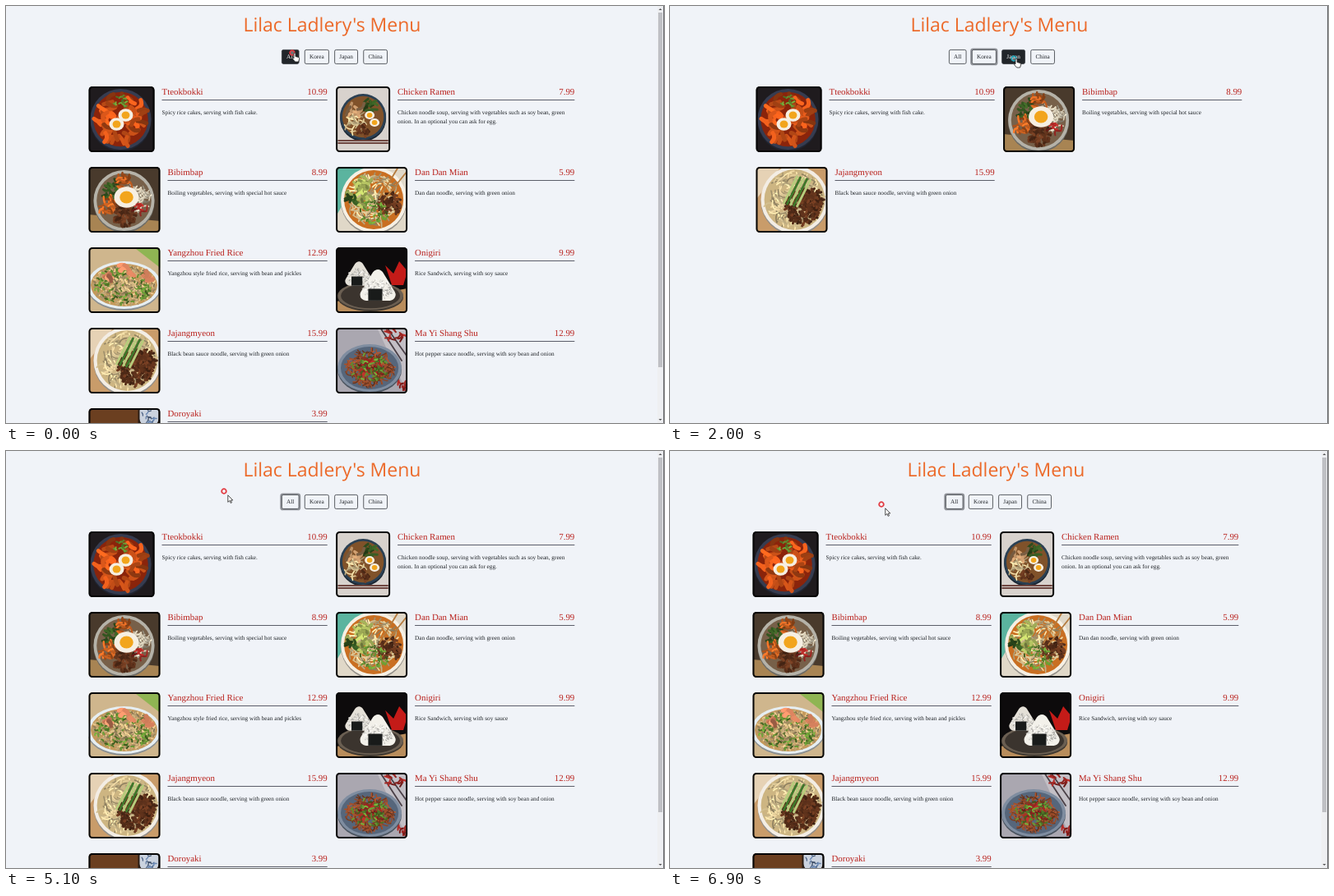
Write an HTML page that moves like this. It is 800x508 px and loops after 7000 ms.

```html
<!DOCTYPE html>
<html lang="en">
<head>
<meta charset="utf-8">
<title>Menu</title>
<style>
  html, body { margin: 0; width: 100%; height: 100%; overflow: hidden; background: #f0f3f8; }
  svg { display: block; }
  text { font: 7.26px "Liberation Serif", "Times New Roman", serif; fill: #212529; text-rendering: geometricPrecision; }
  .head { font-size: 10.88px; fill: #b9211c; }
  .title { font: 500 23px "Open Sans", sans-serif; fill: #ec6a2a; text-anchor: middle; }
  .end { text-anchor: end; }
  .mid { text-anchor: middle; }
</style>
</head>
<body>
<svg id="stage" width="800" height="508" viewBox="0 0 800 508"></svg>
<script>
let seed = 11;
const random = () => (seed = seed * 16807 % 2147483647) / 2147483647;
const spread = size => (random() * 2 - 1) * size;

// Drawing helpers that return SVG markup
const rect = (x, y, w, h, fill, extra = '') =>
  `<rect x="${x}" y="${y}" width="${w}" height="${h}" fill="${fill}" ${extra}/>`;
const oval = (x, y, rx, ry, fill) => `<ellipse cx="${x}" cy="${y}" rx="${rx}" ry="${ry}" fill="${fill}"/>`;
const shape = (d, fill) => `<path d="${d}" fill="${fill}"/>`;
const stroke = (d, color, width) =>
  `<path d="${d}" fill="none" stroke="${color}" stroke-width="${width}" stroke-linecap="round"/>`;
const text = (x, y, words, cls = '', extra = '') =>
  `<text x="${x}" y="${y}" class="${cls}" ${extra}>${words}</text>`;
const shade = (hex, level) => `rgb(${hex.match(/\w\w/g).map(h => Math.round(parseInt(h, 16) * level))})`;
const back = color => rect(0, 0, 87, 80, color);
const egg = (x, y, r = 9) => oval(x, y, r, r * .85, '#f6efe2') + oval(x, y, r * .55, r * .5, '#f2a51c');
const chopsticks = (d, color) => stroke(d, color, 1.8);

// Each ingredient: colour, piece length, piece width, how densely it covers its area
const food = {
  riceCake: ['#ee5f1c', 11, 5, 1.1],
  noodle: ['#f0d9a4', 11, 1.6, 1.1],
  redNoodle: ['#a5512c', 8, 1.5, 1.6],
  rice: ['#e2c48c', 3, 1.7, .9],
  whiteRice: ['#faf8f2', 2, 1, .5],
  sprout: ['#e6dcc4', 7, 1.6, 1],
  leaf: ['#3d6426', 6, 3, 1.2],
  lettuce: ['#bccb66', 7, 3.5, 1.1],
  scallion: ['#6c9f36', 3, 2, .3],
  carrot: ['#ea7026', 7, 2.4, 1.2],
  shrimp: ['#f3936a', 7, 5, .8],
  chicken: ['#d6a474', 11, 3.5, .9],
  mince: ['#6d3a20', 3, 3, 1.2],
  chili: ['#b82c28', 7, 2, .6],
  blue: ['#6e8dbb', 4, 1.3, .3]
};

const plate = (x, y, rx, ry, rim, inside) => ({
  x, y, rx: rx * .84, ry: ry * .84,
  svg: oval(x, y + 2, rx, ry, shade(rim, .6)) + oval(x, y, rx, ry, rim) + oval(x, y, rx * .9, ry * .9, inside)
});

// Scattered pieces on part of a plate; the part is named by its clock hour, or is the middle
function heap({ x, y, rx, ry }, kind, size, hour) {
  const [color, length, width, cover] = food[kind];
  const angle = hour * Math.PI / 6, out = hour === undefined ? 0 : 1 - size;
  const cx = x + (out && rx * out * Math.sin(angle)), cy = y - (out && ry * out * Math.cos(angle));
  const count = cover * Math.PI * rx * ry * size * size / (length * width);
  let svg = '';
  for (let i = 0; i < count; i++) {
    const a = random() * 7, far = Math.sqrt(random()) * size, turn = random() * 7, bow = spread(.5);
    const dx = length * Math.cos(turn), dy = length * Math.sin(turn);
    const px = cx + rx * far * Math.cos(a) - dx / 2, py = cy + ry * far * Math.sin(a) - dy / 2;
    const curve = [dx / 2 - dy * bow, dy / 2 + dx * bow, dx, dy].map(v => v.toFixed(1));
    svg += stroke(`M${px.toFixed(1)} ${py.toFixed(1)}q${curve}`, shade(color, .55 + random() * .6), width);
  }
  return svg;
}
const serve = (dish, ...heaps) => dish.svg + heaps.map(h => heap(dish, ...h)).join('');

// Rounded rice triangle with a strip of seaweed
const riceBall = (x, y, s, color) =>
  `<path d="M${x} ${y - s * .65}l${s * .8} ${s * 1.3}h${-s * 1.6}z" fill="${color}" stroke="${color}"
    stroke-width="${s * .8}" stroke-linejoin="round"/>` +
  heap({ x, y: y + s * .3, rx: s, ry: s * .7 }, 'whiteRice', 1) +
  rect(x - s * .65, y + s * .25, s * .95, s * .8, '#191b1a');

const art = {
  tteokbokki: () => back('#1f1b1e') + serve(plate(39, 40, 37, 37, '#363c50', '#8a240b'),
    ['riceCake', .95], ['scallion', .3, 0]) + egg(45, 35) + egg(34, 46),

  ramen: () => back('#d8d2cd') + serve(plate(33, 37, 28, 28, '#2b4053', '#80522a'),
    ['noodle', .5, 8], ['leaf', .35, 1], ['mince', .3, 6], ['chicken', .4, 10.5]) + egg(41, 35, 6) + egg(47, 44, 6) +
    chopsticks('M3 66H63M3 69H63', '#6f4741'),

  bibimbap: () => back('#493a2c') + shape('M0 58L87 66V80H0z', '#a88453') +
    serve(plate(43, 41, 37, 37, '#b5b2a8', '#776049'), ['sprout', .55, 2.5], ['leaf', .4, 10.5], ['carrot', .36, 8.5],
      ['carrot', .3, 0], ['mince', .45, 6], ['chili', .25, 4]) + egg(46, 37, 15),

  dandan: () => back('#e0d8c8') + shape('M0 0H36L0 60z', '#5bb49f') +
    serve(plate(46, 40, 40, 40, '#f6f0e4', '#c96f22'), ['noodle', .9], ['lettuce', .45, 9.5], ['leaf', .2, 9],
      ['lettuce', .25, 11], ['mince', .4, 3.5], ['scallion', .5, 6]) + chopsticks('M53 38L76 0M59 40L86 6', '#b57b3d'),

  friedRice: () => back('#cfb68d') + shape('M55 0H87V25z', '#8fb553') +
    serve(plate(43, 46, 45, 29, '#e6eef2', '#c4995c'), ['rice', 1], ['scallion', .95], ['shrimp', .3, 0],
      ['shrimp', .25, 10.5], ['shrimp', .25, 2], ['rice', .4]),

  onigiri: () => back('#0d0b0c') + shape('M0 66L87 50V80H0z', '#b98d5c') +
    shape('M60 22L70 32 77 17 87 29 82 46H68z', '#c41b18') +
    plate(42, 59, 40, 17, '#6b5f52', '#3b342e').svg + riceBall(28, 32, 14, '#e4e0d7') + riceBall(51, 46, 18, '#f3f1ea'),

  jajangmyeon: () => back('#c99c6a') + shape('M0 0H30L0 40z', '#e6d2b5') +
    serve(plate(47, 40, 41, 41, '#f3ede4', '#cdb582'), ['noodle', .95], ['mince', .62, 4.5], ['mince', .45, 3]) +
    [0, 1, 2, 3, 4].map(i => stroke(`M${50 + i * 4} ${12 + i}l-16 32`, i % 2 ? '#3f762a' : '#b7cc7c', 2.8)).join(''),

  mayi: () => back('#aaa7b0') + shape('M50 0H87V80z', '#c3bfc5') + chopsticks('M54 0L80 40M62 0L86 34', '#4a4047') +
    heap({ x: 72, y: 9, rx: 11, ry: 8 }, 'chili', 1) + heap({ x: 79, y: 70, rx: 8, ry: 8 }, 'chili', 1) +
    serve(plate(41, 49, 39, 29, '#7f8da0', '#56667b'), ['redNoodle', .85], ['chili', .5], ['scallion', .7]),

  dorayaki: () => back('#2a1c14') + shape('M0 0H60V26L0 34z', '#6b3f20') + rect(62, -6, 23, 28, '#cbd3df', 'rx="9"') +
    heap({ x: 73, y: 10, rx: 9, ry: 9 }, 'blue', 1) + serve(plate(43, 54, 41, 22, '#d7e0ea', '#eceff2'), ['blue', 1]) +
    oval(32, 52, 22, 10, '#e0b173') + oval(32, 47, 23, 11, '#a5602a') + oval(31, 45, 18, 7, '#bd7a3a') +
    shape('M34 32Q51 27 68 60Q40 66 34 32z', '#e6bb7d') + shape('M34 32Q70 22 68 60Q54 39 34 32z', '#b46d2c') +
    stroke('M37 36Q53 43 64 60', '#321711', 3)
};

const dishes = [
  ['tteokbokki', 80, 'Korea', 'Tteokbokki', '10.99', 'Spicy rice cakes, serving with fish cake.'],
  ['ramen', 66, 'Japan', 'Chicken Ramen', '7.99', 'Chicken noodle soup, serving with vegetables such as soy bean, green',
    'onion. In an optional you can ask for egg.'],
  ['bibimbap', 87, 'Korea', 'Bibimbap', '8.99', 'Boiling vegetables, serving with special hot sauce'],
  ['dandan', 87, 'China', 'Dan Dan Mian', '5.99', 'Dan dan noodle, serving with green onion'],
  ['friedRice', 87, 'China', 'Yangzhou Fried Rice', '12.99', 'Yangzhou style fried rice, serving with bean and pickles'],
  ['onigiri', 87, 'Japan', 'Onigiri', '9.99', 'Rice Sandwich, serving with soy sauce'],
  ['jajangmyeon', 87, 'Korea', 'Jajangmyeon', '15.99', 'Black bean sauce noodle, serving with green onion'],
  ['mayi', 87, 'China', 'Ma Yi Shang Shu', '12.99', 'Hot pepper sauce noodle, serving with soy bean and onion'],
  ['dorayaki', 87, 'Japan', 'Doroyaki', '3.99', 'Red bean paste dessert, serving with honey.']
];

function card([id, w, , name, price, ...lines], index) {
  const left = w + 9, right = 290.2;
  return `<g transform="translate(${100.5 + index % 2 * 300.6} ${98 + (index >> 1) * 98})">
    <use href="#${id}"/>${rect(1, 1, w - 2, 78, 'none', 'rx="3.5" stroke="#050505" stroke-width="2"')}
    ${text(left, 10.3, name, 'head')}${text(right, 10.3, price, 'head end')}
    ${rect(left, 16, right - left, 1, '#5b5d69')}
    ${lines.map((line, i) => text(left, 33.7 + i * 11, line)).join('')}</g>`;
}

// Buttons in a row, each as wide as its label plus padding
const pen = document.createElement('canvas').getContext('2d');
pen.font = '72.6px "Liberation Serif", "Times New Roman", serif';
let edge = 335;
const buttons = ['All', 'Korea', 'Japan', 'China'].map(name => {
  const w = pen.measureText(name).width / 10 + 12.2, x = edge;
  edge += w + 6.4;
  return { name, x, w };
});

document.getElementById('stage').innerHTML = `<defs><filter id="soft"><feGaussianBlur stdDeviation=".4"/></filter>
  ${dishes.map(([id, w]) => `<clipPath id="${id}Frame">${rect(0, 0, w, 80, '#000', 'rx="4.5"')}</clipPath>
    <g id="${id}" clip-path="url(#${id}Frame)"><g filter="url(#soft)">${art[id]()}</g></g>`).join('')}</defs>
  <g id="page">${text(396.5, 31.3, "Lilac Ladlery's Menu", 'title')}<g id="buttons"></g>
  ${buttons.map(({ name }) => `<g id="view${name}">${
    dishes.filter(dish => name === 'All' || dish[2] === name).map(card).join('')}</g>`).join('')}</g>
  <g id="scrollbar">${rect(792, 0, 7, 508, '#eeeff2')}
    ${shape('M793.5 5l2-2 2 2zM793.5 503l2 2 2-2z', '#555')}
    <rect id="thumb" x="793" width="5" height="432" fill="#bfc0c4"/></g>
  ${rect(799, 0, 1, 508, '#707175')}<g id="pointer"></g>`;
const part = id => document.getElementById(id);

// Value after a series of eased moves [start time, ...new values], each 300 ms long
const glide = (from, moves, t) => moves.reduce((now, [start, ...to]) => {
  const u = Math.min(1, Math.max(0, (t - start) / 300)), ease = u * u * (3 - 2 * u);
  return now.map((value, i) => value + (to[i] - value) * ease);
}, from);

const pointerMoves = [[100, 374, 60], [500, 360, 57], [1500, 418, 64], [2600, 443, 65], [4000, 346, 58],
  [4500, 265, 49], [5200, 257, 65]];
const clicks = [[400, 'Korea'], [2200, 'Japan'], [3200, 'China'], [4500, 'All']];
const pointerAt = t => glide([348, 57], pointerMoves, t);
const scrollAt = t => glide([0], [[5500, 65.5], [6400, 0]], t)[0];
const focusAt = t => clicks.filter(([time]) => time <= t).map(([, name]) => name).pop();
const shiftAt = t => (focusAt(t) || 'All') === 'All' ? 0 : 4;

function hoverAt(t) {
  const [x, y] = pointerAt(t).map(v => v + 4.5), top = 53 - scrollAt(t);
  const over = b => x >= b.x + shiftAt(t) && x <= b.x + b.w + shiftAt(t) && y >= top && y <= top + 18;
  return buttons.find(over)?.name;
}

function button({ name, x, w }, t) {
  const dark = hoverAt(t) === name ? 1 : t >= 100 && hoverAt(t - 100) === name ? .88 : 0;
  const ring = focusAt(t) === name
    ? rect(x - .8, 52.4, w + 1.6, 19, 'none', 'rx="2.5" stroke="#8d9096" stroke-width="1.8"') : '';
  return ring + rect(x + .4, 53.4, w - .8, 17, '#212529', `fill-opacity="${dark}" rx="1.8" stroke="#34383d" stroke-width=".8"`) +
    text(x + w / 2, 64.3, name, 'mid', dark ? 'style="fill:#fff"' : '');
}

function draw(t) {
  const view = focusAt(t) || 'All', scroll = scrollAt(t);
  part('page').setAttribute('transform', `translate(${shiftAt(t)} ${-scroll})`);
  part('buttons').innerHTML = buttons.map(b => button(b, t)).join('');
  for (const { name } of buttons) part('view' + name).style.display = name === view ? '' : 'none';
  part('scrollbar').style.display = view === 'All' ? '' : 'none';
  part('thumb').setAttribute('y', 8 + scroll * .855);

  const color = t >= 300 && t < 4700 ? '#22a5b8' : '#e23b42';
  const halo = t >= 500 && t < 1000
    ? `<circle r="4.6" fill="none" stroke="${color}" stroke-width="1.2" stroke-dasharray="1.5 .8"/>` : '';
  const hand = 'M2 6V.7Q3-.8 4 .7V4.5L8 5.5Q8.8 6 8.6 8L7.5 11H3.6L.5 7.5Q.6 6 2 6.8z';
  const arrow = 'M4.8 4.8v8.5l2-1.8 1.4 2.9 1.3-.6L8.1 11h2.7z';
  part('pointer').setAttribute('transform', `translate(${pointerAt(t)})`);
  part('pointer').innerHTML = `${halo}<circle r="2.8" fill="#fff" fill-opacity=".35" stroke="${color}" stroke-width="1.8"/>
    <path d="${hoverAt(t) ? hand : arrow}" fill="#fff" stroke="#222" stroke-width=".8"/>`;
}

let shown = -1;
function tick() {
  const t = Math.floor(performance.now() % 7000 / 100) * 100;
  if (t !== shown) draw(shown = t);
  requestAnimationFrame(tick);
}
tick();
</script>
</body>
</html>
```
